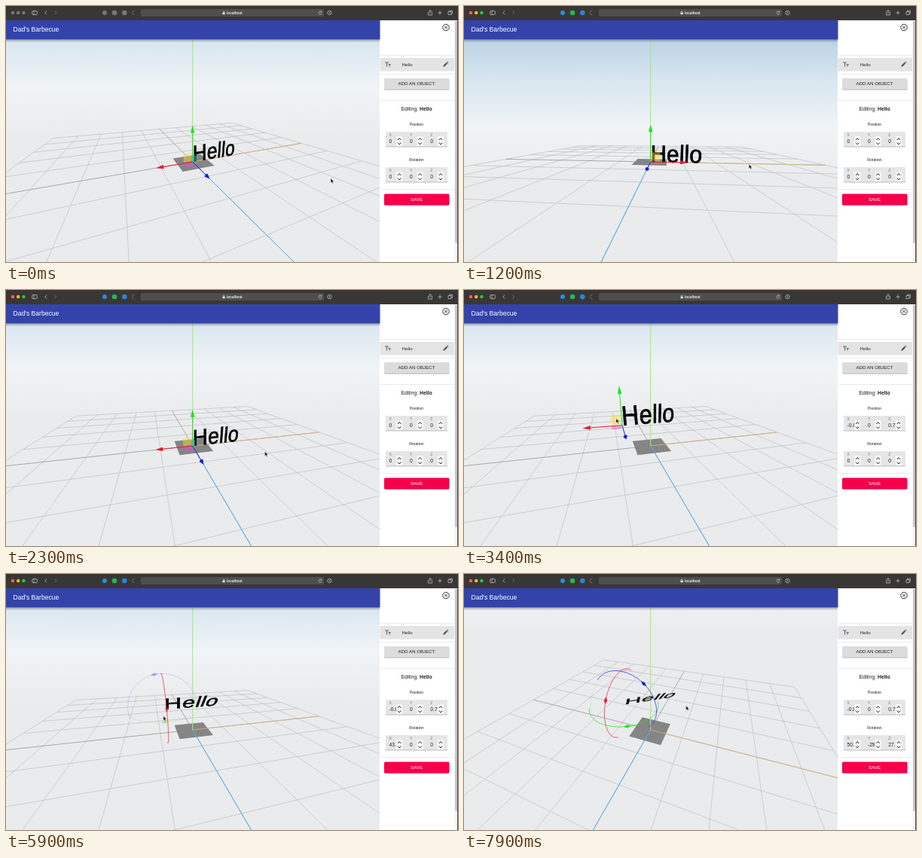
An HTML page with a canvas that plays this animation: 600 px wide and 340 px high, repeating every 8 s.

```html
<!DOCTYPE html>
<html lang="en">
<head>
<meta charset="utf-8">
<title>Scene editor</title>
<style>
html, body { margin: 0; width: 100%; height: 100%; overflow: hidden; background: #fff; }
canvas, svg { position: absolute; left: 0; top: 0; width: 600px; height: 340px; }
text { font-family: "Liberation Sans", Arial, sans-serif; }
</style>
</head>
<body>
<canvas id="scene"></canvas>
<svg viewBox="0 0 600 340" fill="none">
  <defs>
    <linearGradient id="shade" x2="0" y2="1">
      <stop stop-color="#000" stop-opacity=".3"/><stop offset="1" stop-color="#000" stop-opacity="0"/>
    </linearGradient>
  </defs>
  <path d="M0 44.5h496v4H0z" fill="url(#shade)"/>
  <path d="M496 19h104v321H496z" fill="#fff"/>
  <path d="M0 18h496.500v26.500H0z" fill="#3343aa"/>
  <text x="9.5" y="34.3" font-size="8.6" fill="#fff">Dad's Barbecue</text>

  <path d="M0 0h600v19H0z" fill="#393736"/>
  <rect x="179" y="4" width="243" height="10" rx="2" fill="#504e4d"/>
  <g id="lights"><circle cx="9" cy="9" r="2.2"/><circle cx="16.2" cy="9" r="2.2"/><circle cx="23.4" cy="9" r="2.2"/></g>
  <g id="badges"><circle cx="131" cy="9" r="3"/><circle cx="144" cy="9" r="3.3"/><circle cx="157.3" cy="9" r="3.3"/></g>
  <g stroke="#bbb" stroke-width=".8">
    <rect x="34.7" y="6.5" width="6.6" height="5" rx="1"/><path d="M37 6.5v5M54 6.6l-2.2 2.4 2.2 2.4"/>
    <path d="M64.5 6.6l2.2 2.4-2.2 2.4M170.5 6a3 3 0 0 0 0 6" stroke="#777"/>
    <path d="M418.7 8a2 2 0 1 0 .2 1.7M418.8 6.6v1.6h-1.6"/>
    <circle cx="429.5" cy="9" r="2.7"/><path d="M429.5 7.5v3"/>
    <path d="M561.5 8h-1v4h5v-4h-1M563 10V5.5m-1.5 1.500l1.500-1.500 1.500 1.500M573.5 9h5M576 6.5v5"/>
    <path d="M587 7.5h4v4h-4zM588.5 7.5v-1.3h4v4H591"/>
  </g>
  <path d="M287.600 8.600h3v2.600h-3z" fill="#eee"/><path d="M288.200 8.600v-.8a.9.9 0 0 1 1.800 0v.8" stroke="#eee" stroke-width=".6"/>
  <text x="293" y="10.700" font-size="4.700" font-weight="bold" fill="#eee">localhost</text>

  <path d="M595 19h5v321h-5z" fill="#f7f7f7"/>
  <rect x="596.3" y="20" width="2.4" height="295" rx="1.2" fill="#bdbdbd"/>
  <path d="M599.500 19v321" stroke="#444"/>
  <g stroke="#222" stroke-width=".9"><circle cx="584" cy="28.5" r="4.3"/><path d="M582 26.500l4 4m0-4l-4 4"/></g>
  <path d="M496.500 65.500h99M496.500 90.500h99M496.500 125.500h99M496.500 243.500h99" stroke="#e2e2e2" stroke-width=".7"/>
  <path d="M496.500 69h98.500v17.500h-98.500z" fill="#e4e4e4"/>
  <path d="M503 75h5m-2.500 0v5.500M507.500 77.500h3.300m-1.600 0v3" stroke="#666" stroke-width="1.1"/>
  <path d="M580.500 80.500v-1.600l4.200-4.200 1.600 1.600-4.200 4.200zM585.200 74.200l.8-.8 1.600 1.600-.8.8z" fill="#555"/>
  <rect x="502" y="97" width="86.500" height="14.700" rx="1.500" fill="#c4c4c4"/>
  <rect x="502" y="96" width="86.500" height="14.500" rx="1.500" fill="#dcdcdc"/>
  <rect x="502" y="250.500" width="86.500" height="14.800" rx="1.500" fill="#dcb4c0"/>
  <rect x="502" y="249.600" width="86.500" height="14.800" rx="1.500" fill="#f6004c"/>
  <g fill="#222">
    <text x="525.5" y="79.600" font-size="6.2">Hello</text>
    <g text-anchor="middle">
      <text x="545" y="105.2" font-size="6.2">ADD AN OBJECT</text>
      <text x="545" y="139.3" font-size="6.8">Editing: <tspan font-weight="bold">Hello</tspan></text>
      <text x="545" y="158.7" font-size="5.2">Position</text>
      <text x="545" y="205.7" font-size="5.2">Rotation</text>
      <text x="545" y="259.2" font-size="6.2" fill="#fff">SAVE</text>
    </g>
  </g>
  <g id="fields"></g>
  <path id="cursor" d="M0 0v5.800l1.400-1.200 1 2.200 1-.5-1-2.100h1.900z" fill="#111" stroke="#fff" stroke-width=".35"/>
</svg>
<script>
const LOOP = 8000, CX = 247.7, CY = 207, FOCAL = 211, DIST = 5;
const AXES = [[1, 0, 0], [0, 1, 0], [0, 0, 1]];
const COLORS = ['#f01830', '#18e818', '#1c1cdc'];
const $ = id => document.getElementById(id);
const canvas = $('scene'), ctx = canvas.getContext('2d');
const ratio = window.devicePixelRatio || 1;
canvas.width = 600 * ratio;
canvas.height = 340 * ratio;

// Vectors
const add = (p, q, k = 1) => p.map((v, i) => v + q[i] * k);
const mix = (p, q, u) => add(p, add(q, p, -1), u);
const dot = (p, q) => p.reduce((sum, v, i) => sum + v * q[i], 0);
const unit = p => p.map(v => v / Math.hypot(...p));
const cross = ([a, b, c], [x, y, z]) => [b * z - c * y, c * x - a * z, a * y - b * x];

const rad = degrees => degrees * Math.PI / 180;
function turn(a, b, degrees) {
  const c = Math.cos(rad(degrees)), s = Math.sin(rad(degrees));
  return [a * c - b * s, a * s + b * c];
}
function rotX([x, y, z], d) { [y, z] = turn(y, z, d); return [x, y, z]; }
function rotY([x, y, z], d) { [z, x] = turn(z, x, d); return [x, y, z]; }
function rotZ([x, y, z], d) { [x, y] = turn(x, y, d); return [x, y, z]; }

// Camera orbiting the world origin
let azimuth, elevation;
function toCamera(p) {
  const [x, y, z] = rotX(rotY(p, -azimuth), elevation);
  return [x, y, DIST - z];
}
const toScreen = ([x, y, depth]) => [CX + FOCAL * x / depth, CY - FOCAL * y / depth];
const project = p => toScreen(toCamera(p));
const eyePosition = () => rotY(rotX([0, 0, DIST], -elevation), azimuth);

function path(points) {
  ctx.beginPath();
  points.forEach(p => ctx.lineTo(...p));
}
function polygon(points, color) {
  ctx.fillStyle = color;
  path(points);
  ctx.fill();
}
function stroke(points, color, width) {
  ctx.strokeStyle = color;
  ctx.lineWidth = width;
  path(points);
  ctx.stroke();
}

// Straight segment in space, cut at the near plane
function line3(p, q, color, width) {
  const NEAR = .4;
  let a = toCamera(p), b = toCamera(q);
  if (a[2] < NEAR && b[2] < NEAR) return;
  const cut = (out, inside) => mix(out, inside, (NEAR - out[2]) / (inside[2] - out[2]));
  if (a[2] < NEAR) a = cut(a, b);
  if (b[2] < NEAR) b = cut(b, a);
  stroke([toScreen(a), toScreen(b)], color, width);
}

function drawSky() {
  const horizon = CY - FOCAL * Math.tan(rad(elevation));
  const sky = ctx.createLinearGradient(0, horizon - 130, 0, horizon + 60);
  ['#b7cfe4', '#d8e6f0', '#f0f4f6', '#eaebed'].forEach((color, i) => sky.addColorStop(i / 3, color));
  ctx.fillStyle = sky;
  ctx.fillRect(0, 18, 497, 322);
}

function drawGround() {
  for (let i = -5; i <= 5; i++) {
    const color = i ? '#bfc1c3' : '#8b8d8f';
    line3([i, 0, -5], [i, 0, 5], color, .7);
    line3([-5, 0, i], [5, 0, i], color, .7);
  }
  polygon([[-.5, 0, -.5], [.5, 0, -.5], [.5, 0, .5], [-.5, 0, .5]].map(project), '#858585');
  ['#e4bc7c', '#9cee70', '#5ab2e8'].forEach((color, i) =>
    line3([0, 0, 0], AXES[i].map(v => v * 5), color, i ? 1 : .7));
}

function drawWord(origin, along, up) {
  const WIDTH = .0069, HEIGHT = .0074;
  ctx.font = '100px "Liberation Sans", Arial, sans-serif';
  ctx.fillStyle = ctx.strokeStyle = '#060606';
  ctx.lineWidth = 2.5;
  let corner = origin;
  for (const ch of 'Hello') {
    const w = ctx.measureText(ch).width, next = add(corner, along, w * WIDTH);
    const p = project(corner), px = project(next), py = project(add(corner, up, 100 * HEIGHT));
    ctx.save();
    ctx.transform((px[0] - p[0]) / w, (px[1] - p[1]) / w, (p[0] - py[0]) / 100, (p[1] - py[1]) / 100, ...p);
    ctx.fillText(ch, 0, 0);
    ctx.strokeText(ch, 0, 0);
    ctx.restore();
    corner = next;
  }
}

function drawArrow(origin, dir, size, color) {
  line3(origin, add(origin, dir, size * .9), color, 1);
  const base = project(add(origin, dir, size * .9)), tip = project(add(origin, dir, size * 1.1));
  const [dx, dy] = add(tip, base, -1), length = Math.hypot(dx, dy);
  const side = [-dy / length * 2.6, dx / length * 2.6];
  polygon([add(base, side), tip, add(base, side, -1)], color);
  ctx.beginPath();
  ctx.ellipse(...base, Math.max(.5, 2.6 - length * .2), 2.6, Math.atan2(dy, dx), 0, 7);
  ctx.fill();
}

function drawMoveGizmo(origin, size) {
  const [X, Y, Z] = AXES, toward = X.map(v => v * (azimuth < 0 ? -1 : 1));
  const plane = (u, v, color) => {
    const at = (i, j) => project(add(add(origin, u, i), v, j));
    polygon([at(.03, .03), at(.3, .03), at(.3, .3), at(.03, .3)], color);
  };
  ctx.globalAlpha = .45;
  plane(toward, Z, '#ff40d0');
  plane(Y, Z, '#30e0f0');
  plane(toward, Y, '#ffe030');
  ctx.globalAlpha = 1;
  [toward, Y, Z].forEach((dir, i) => drawArrow(origin, dir, size, COLORS[i]));
}

// Each ring shows its half nearest the eye, with a handle in the middle
function drawTurnGizmo(origin, size, held) {
  const eye = add(eyePosition(), origin, -1);
  AXES.forEach((axis, i) => {
    const front = unit(add(eye, axis, -dot(eye, axis))), side = cross(axis, front);
    const at = (degrees, r = size) => {
      const [c, s] = turn(r, 0, degrees);
      return project(add(add(origin, front, c), side, s));
    };
    const arc = [];
    for (let d = -90; d <= 90; d += 5) arc.push(at(d));
    const idle = held !== null && held !== i;
    ctx.globalAlpha = idle ? .2 : .75;
    stroke(arc, COLORS[i], idle ? .7 : .9);
    ctx.globalAlpha = idle ? .3 : held === i ? .6 : 1;
    const middle = at(0), [dx, dy] = unit(add(at(5), at(-5), -1));
    const across = [-dy * 2.2, dx * 2.2], lengthwise = [dx * 5, dy * 5];
    polygon([add(middle, lengthwise), add(middle, across), add(middle, lengthwise, -1), add(middle, across, -1)], COLORS[i]);
  });
  ctx.globalAlpha = .3;
  ctx.beginPath();
  ctx.arc(...project(origin), FOCAL * size / toCamera(origin)[2], 0, 7);
  ctx.lineWidth = .5;
  ctx.strokeStyle = '#aaa';
  if (held === null) ctx.stroke();
  ctx.globalAlpha = 1;
}

// Number fields
$('fields').innerHTML = [167, 214].map(y =>
  `<path d="M504 ${y}h82v20h-82z" fill="#e6e6e6"/><path d="M504 ${y + 20}h82" stroke="#999" stroke-width=".6"/>` +
  ['X', 'Y', 'Z'].map((axis, i) => `<g transform="translate(${508.5 + 27.4 * i} ${y})">
    <text y="6.2" font-size="5" fill="#777">${axis}</text>
    <text class="value" y="15.3" font-size="6.7" fill="#222">0</text>
    <path d="M9.5 5h9v14h-9z" fill="#e6e6e6"/>
    <rect x="9.7" y="6" width="8" height="13" rx="1.5" fill="#fafafa"/>
    <path d="M11.5 11l2.2-2.5 2.2 2.5m-4.400 3.500l2.200 2.500 2.200-2.500" stroke="#222"/></g>`).join('')).join('');
const values = [...document.querySelectorAll('.value')];

function paint(group, active, colors) {
  [...group.children].forEach((node, i) => node.setAttribute('fill', active ? colors[i] : '#777'));
}

function frame(now) {
  const t = Math.floor(now % LOOP / 100) * 100;
  const span = (from, to) => Math.min(1, Math.max(0, (t - from) / (to - from)));

  // Camera drags
  const drag1 = span(500, 900), drag2 = span(900, 1500), drag3 = span(1500, 2100), drag4 = span(7500, 7900);
  azimuth = -22.6 + 11.7 * drag1 + 32.8 * drag2 - 36 * drag3 + 35.1 * drag4;
  elevation = 24.3 - 14.3 * drag1 + 2.5 * drag2 + 12.9 * drag3 + 16.6 * drag4;

  // Object: moved, tilted, swung, then settled
  const moved = span(2700, 3300), settled = span(7100, 7400);
  const origin = [-.83 * moved, .74 * moved, 0];
  const tilt = 43 * span(5000, 5900) + 7 * settled, yaw = 48 * span(6400, 7100) * (1 - settled);
  const orient = v => rotY(rotX(rotY(rotZ(v, -29 * settled), 27 * settled), tilt), yaw);
  const size = 1.04 * Math.hypot(...add(eyePosition(), origin, -1)) / DIST;

  ctx.setTransform(ratio, 0, 0, ratio, 0, 0);
  drawSky();
  drawGround();
  drawWord(origin, orient(AXES[0]), orient(AXES[1]));
  if (t < 4100) drawMoveGizmo(origin, size);
  else drawTurnGizmo(origin, size, t < 4600 || t >= 7300 ? null : t < 6100 ? 0 : 1);

  // The pointer follows the camera drags and the held handle
  const orbit = [403 - .88 * (azimuth + 22.6), 222 + .9 * (elevation - 24.3)];
  const toRing = span(3900, 4700), swing = span(6400, 7100);
  const grip = add(project(origin), [-8 + 7 * toRing + 10 * swing, -9 + 18 * toRing + 13 * swing]);
  let pointer = add(orbit, [28, 7], 1 - span(0, 500));
  pointer = mix(pointer, grip, span(2100, 2700));
  pointer = mix(pointer, add(orbit, [-70, -63]), span(7250, 7500));
  $('cursor').setAttribute('transform', `translate(${pointer})`);

  const short = v => v ? v.toFixed(1) : '0', done = settled === 1;
  const shown = [short(origin[0]), '0', short(origin[1]), short(tilt), done ? '-29' : '0', done ? '27.' : '0'];
  values.forEach((node, i) => { node.textContent = shown[i]; });
  paint($('lights'), t >= 200, ['#ff5f57', '#febc2e', '#28c840']);
  paint($('badges'), t >= 200, ['#2a8de0', '#1fb955', '#2686dc']);
  requestAnimationFrame(frame);
}
requestAnimationFrame(frame);
</script>
</body>
</html>
```
